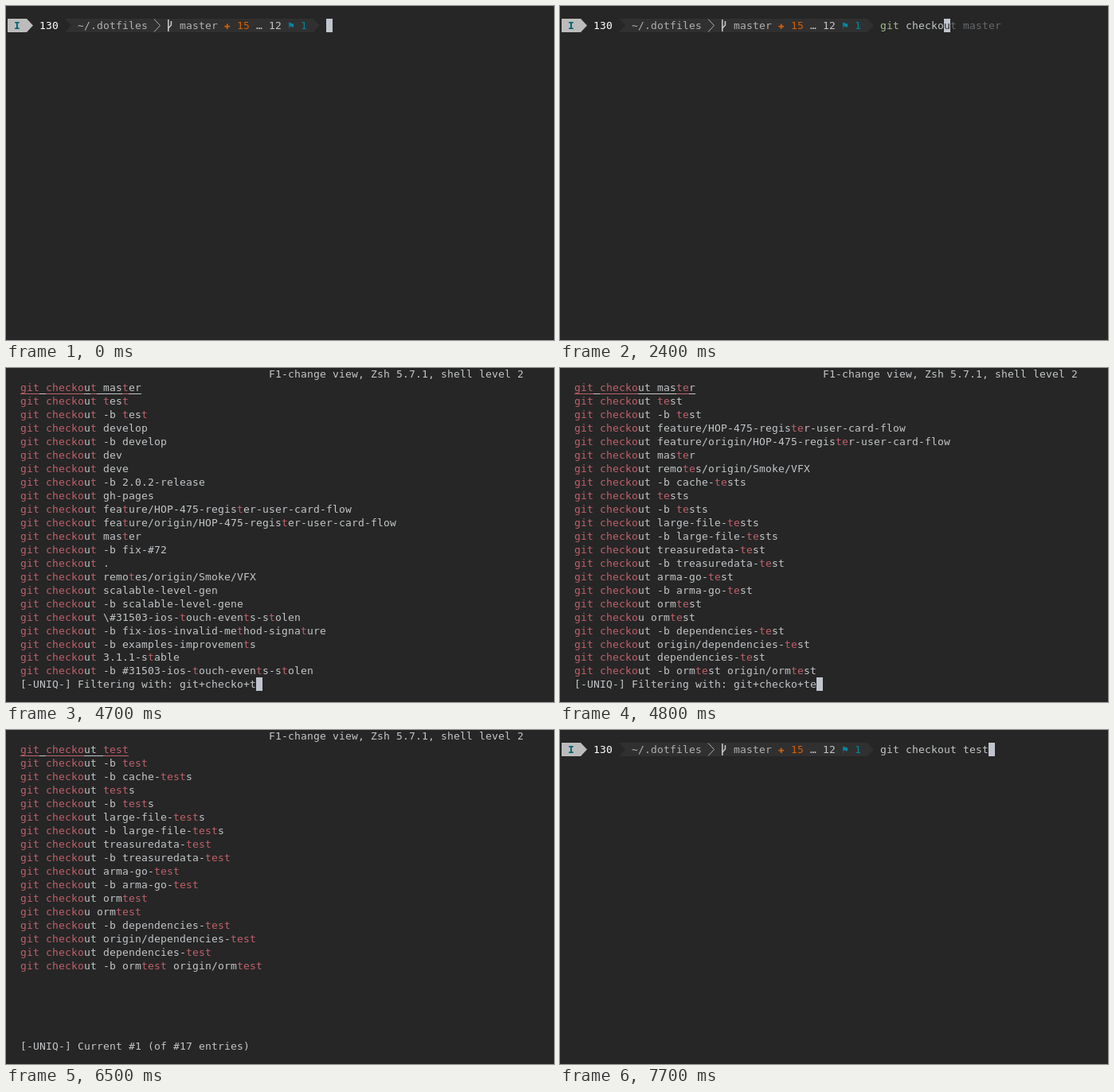
Animation of 688 by 420 pixels, one loop 8 s. Source, as an HTML page with a canvas:

```html
<!DOCTYPE html>
<html lang="en">
<head>
<meta charset="utf-8">
<title>Shell history search</title>
<style>
  html, body { margin: 0; width: 100%; height: 100%; overflow: hidden; background: #262626; }
  canvas { display: block; }
</style>
</head>
<body>
<canvas id="stage" width="688" height="420"></canvas>
<script>
const ctx = document.getElementById('stage').getContext('2d');
const LOOP = 8000;
const CELL = 8, LINE = 16.957;
const FONT = '13px "DejaVu Sans Mono", monospace';
const C = {
  bg: '#262626', text: '#c3c6c9', cursor: '#c0c5ce', match: '#bf616a', command: '#a3be8c',
  hint: '#66696c', segment: '#303030', mode: '#bcbcbc', modeText: '#005f6f',
  prompt: '#b2b2b2', white: '#ffffff', orange: '#d75f00', teal: '#0087a0'
};

const PROMPT_END = 50;
const SUGGESTION = 'git checkout master';
const KEY_TIMES = [1000, 1100, 1200, 1300, 1400, 1600, 1700, 1800, 1900, 2400];
const SEARCH_START = 2800, BROWSE_START = 6500, SEARCH_END = 7600;
const FILTER_TIMES = [4700, 4800, 4900, 5000];

const history = [
  'master', 'test', '-b test', 'develop', '-b develop', 'dev', 'deve', '-b 2.0.2-release',
  'gh-pages', 'feature/HOP-475-register-user-card-flow',
  'feature/origin/HOP-475-register-user-card-flow', 'master', '-b fix-#72', '.',
  'remotes/origin/Smoke/VFX', 'scalable-level-gen', '-b scalable-level-gene',
  '\\#31503-ios-touch-events-stolen', '-b fix-ios-invalid-method-signature',
  '-b examples-improvements', '3.1.1-stable', '-b #31503-ios-touch-events-stolen',
  '-b cache-tests', 'tests', '-b tests', 'large-file-tests', '-b large-file-tests',
  'treasuredata-test', '-b treasuredata-test', 'arma-go-test', '-b arma-go-test',
  'ormtest', 'git checkou ormtest', '-b dependencies-test', 'origin/dependencies-test',
  'dependencies-test', '-b ormtest origin/ormtest'
].map(s => s.startsWith('git ') ? s : 'git checkout ' + s);

const colX = col => 2 + col * CELL;
const rowTop = row => Math.round(row * LINE - 0.9);
const baseline = row => Math.round(row * LINE + 12.4);
const pressed = (times, t) => times.filter(k => t >= k).length;

function rect(x, y, w, h, color) {
  ctx.fillStyle = color;
  ctx.fillRect(x, y, w, h);
}

function write(text, col, row, color = C.text, underline = false) {
  const y = baseline(row);
  [...text].forEach((ch, i) => {
    const x = colX(col + i);
    ctx.fillStyle = typeof color === 'function' ? color(i) : color;
    ctx.fillText(ch, x, y);
    if (underline) ctx.fillRect(x, y + 3, CELL, 1);
  });
}

function cursor(col, row, ch = '') {
  rect(colX(col), rowTop(row), CELL, 17, C.cursor);
  write(ch, col, row, C.bg);
}

function arrow(col, color) {
  const x = colX(col);
  ctx.fillStyle = color;
  ctx.beginPath();
  ctx.moveTo(x, 16);
  ctx.lineTo(x + CELL, 24.5);
  ctx.lineTo(x, 33);
  ctx.fill();
}

function stroke(color, width, ...points) {
  ctx.strokeStyle = color;
  ctx.lineWidth = width;
  ctx.beginPath();
  points.forEach(([x, y]) => ctx.lineTo(x, y));
  ctx.stroke();
}

function drawPrompt() {
  rect(2, 16, 24, 17, C.mode);
  arrow(3, C.mode);
  ctx.font = 'bold ' + FONT;
  write('I', 1, 1, C.modeText);
  ctx.font = FONT;
  write('130', 5, 1, C.white);

  rect(74, 16, 312, 17, C.segment);
  arrow(9, C.bg);
  arrow(48, C.segment);
  write('~/.dotfiles', 11, 1, C.prompt);
  stroke(C.prompt, 1, [186, 16.5], [193.5, 24.5], [186, 32.5]);
  stroke(C.text, 1.6, [203.8, 17], [203.8, 32]);
  stroke(C.text, 1.6, [207.4, 19], [207.4, 24], [203.8, 28]);
  write('master', 27, 1, C.prompt);
  write('✚ 15', 34, 1, C.orange);
  write('… 12', 39, 1, C.text);
  write('⚑ 1', 44, 1, C.teal);
}

function drawTyping(t) {
  const n = pressed(KEY_TIMES, t);
  const typed = SUGGESTION.slice(0, n);
  write(typed.slice(0, 4), PROMPT_END, 1, C.command);
  write(typed.slice(4), PROMPT_END + 4, 1, C.text, n === 5);
  if (n) write(SUGGESTION.slice(n), PROMPT_END + n, 1, C.hint);
  cursor(PROMPT_END + n, 1, n ? SUGGESTION[n] : '');
}

function drawEntry(line, row, words) {
  const hits = new Set();
  for (const word of words)
    for (let at = line.indexOf(word); at >= 0; at = line.indexOf(word, at + word.length))
      for (let i = 0; i < word.length; i++) hits.add(at + i);
  write(line, 2, row, i => hits.has(i) ? C.match : C.text, row === 1);
}

function drawSearch(t) {
  const query = 'git+checko+' + 'test'.slice(0, pressed(FILTER_TIMES, t));
  const words = query.split('+').filter(Boolean);
  const found = history.filter(line => words.every(w => line.includes(w)));

  write('F1-change view, Zsh 5.7.1, shell level 2', 41, 0);
  found.slice(0, 22).forEach((line, i) => drawEntry(line, i + 1, words));

  const browsing = t >= BROWSE_START;
  const status = '[-UNIQ-] ' + (browsing
    ? `Current #1 (of #${found.length} entries)`
    : 'Filtering with: ' + query);
  write(status, 2, 23);
  if (!browsing) cursor(2 + status.length, 23);
}

function draw(t) {
  rect(0, 0, 688, 420, C.bg);
  ctx.font = FONT;
  if (t >= SEARCH_START && t < SEARCH_END) return drawSearch(t);
  drawPrompt();
  if (t < SEARCH_START) return drawTyping(t);
  const chosen = 'git checkout test';
  write(chosen, PROMPT_END, 1);
  cursor(PROMPT_END + chosen.length, 1);
}

const start = performance.now();
function tick() {
  draw((performance.now() - start) % LOOP);
  requestAnimationFrame(tick);
}
tick();
</script>
</body>
</html>
```
